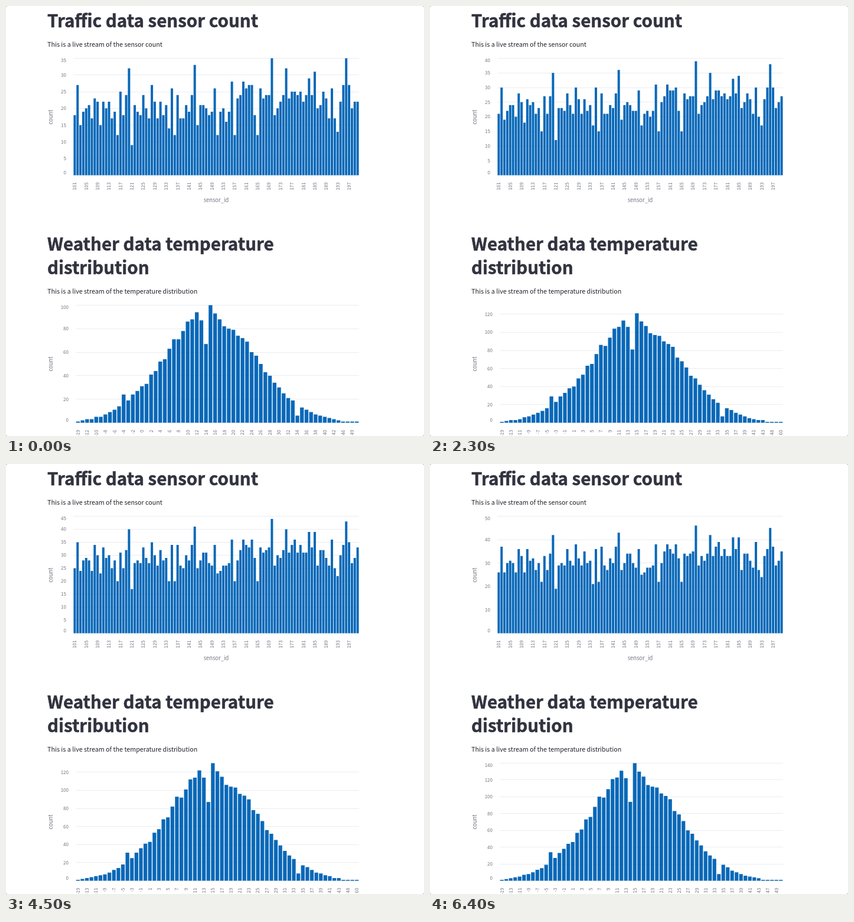
Write an HTML page that moves like this. It is 708x728 px and loops after 8000 ms.

```html
<!DOCTYPE html>
<html lang="en">
<head>
<meta charset="utf-8">
<title>Live stream charts</title>
<style>
  html, body { margin: 0; width: 100%; height: 100%; overflow: hidden; background: #a4a4a6; }
  svg { display: block; width: 708px; height: 728px; font-family: "Noto Sans CJK JP", "Noto Sans CJK SC", "Noto Sans CJK", "Noto Sans", sans-serif; }
  .head { font-size: 29.5px; font-weight: 700; fill: #31333f; stroke: #31333f; stroke-width: 0.55px; }
  .note { font-size: 10.74px; fill: #20212a; }
  .axis { font-size: 9.35px; fill: #717580; text-anchor: middle; }
  .tick { font-size: 8px; fill: #717580; text-anchor: end; }
  .grid { stroke: #e9edf2; }
  .bars { fill: #0868b8; }
</style>
</head>
<body>
<svg viewBox="0 0 708 728">
  <rect width="708" height="728" rx="3" fill="#fff"/>
  <text class="head" x="70" y="36">Traffic data sensor count</text>
  <text class="note" x="70" y="69">This is a live stream of the sensor count</text>
  <g id="traffic"></g>
  <text class="axis" transform="translate(78.5 188) rotate(-90)">count</text>
  <text class="axis" x="356" y="332">sensor_id</text>
  <text class="head" x="70" y="414">Weather data temperature</text>
  <text class="head" x="70" y="453.5">distribution</text>
  <text class="note" x="70" y="486.5">This is a live stream of the temperature distribution</text>
  <g id="weather"></g>
  <text class="axis" transform="translate(78.5 606) rotate(-90)">count</text>
</svg>
<script>
const LOOP = 8000;

// Each update: start ms, counts added per sensor, temperature growth factor
const updates = [
  [0, -3.4, 0.86],
  [400, -1.4, 0.94],
  [500, 0, 1],
  [2300, 0, 1.04],
  [2400, 2, 1.05],
  [4300, 2.4, 1.08],
  [4400, 3.7, 1.1],
  [4500, 5, 1.12],
  [4900, 5, 1.16],
  [5000, 5, 1.17],
  [6300, 6.3, 1.19],
  [6400, 7.2, 1.205]
];

// The most visible peaks and dips; seeded noise fills in the rest
const sensorMarks = { 116: 15, 120: 35, 121: 12, 136: 15, 143: 36, 157: 15, 165: 15, 170: 38.5, 175: 35, 185: 34, 196: 38 };
const tempMarks = { "-4": 28, 12: 109, 14: 78, 15: 116, 34: 7 };

function seeded(seed) {
  return () => {
    seed = (seed * 1664525 + 1013904223) >>> 0;
    return seed / 4294967296;
  };
}

const rand = seeded(11);
const noise = () => rand() + rand() - 1;
const range = (from, to) => Array.from({ length: to - from + 1 }, (_, i) => from + i);
const bell = d => 106 * Math.exp(-(((d - 15) / 14.4) ** 2));

const sensors = range(101, 200).map(label => ({
  label,
  count: sensorMarks[label] ?? 25 + 9 * noise(),
  rate: label in sensorMarks ? 1 : 1 + 0.4 * noise()
}));

const temps = [-19, ...range(-14, 43), ...range(46, 49), 60].map(label => ({
  label,
  count: tempMarks[label] ?? bell(label) * (1 + 0.08 * noise()),
  since: label === -14 ? 500 : label === 47 ? 4900 : 0
}));

const trafficBox = { left: 114, right: 598, top: 88.5, base: 286.5, tickX: 102 };
const weatherBox = { left: 118, right: 598, top: 506.5, base: 705.5, tickX: 106 };

function chart(box, data, nice, ticksEvery, labelEvery) {
  const peak = Math.max(...data.map(d => d.value));
  const max = Math.ceil(peak / nice) * nice;
  const scale = (box.base - box.top) / max;
  const band = (box.right - box.left) / data.length;
  const tickStep = ticksEvery(max);
  let grid = "", ticks = "", bars = "";

  for (let v = 0; v <= max; v += tickStep) {
    const y = box.base - v * scale;
    const shift = v === 0 ? -4 : v === max ? 3.5 : 0;
    grid += `M${box.left} ${Math.floor(y) + 0.5}H${box.right}`;
    ticks += `<text class="tick" x="${box.tickX}" y="${y + shift + 2.9}">${v}</text>`;
  }
  data.forEach(({ label, value }, i) => {
    const mid = box.left + (i + 0.5) * band;
    const half = band * 0.41;
    bars += `M${mid - half} ${box.base}V${box.base - value * scale}H${mid + half}V${box.base}Z`;
    if (i % labelEvery === 0) {
      ticks += `<text class="tick" transform="translate(${mid + 2.9} ${box.base + 12}) rotate(-90)">${label}</text>`;
    }
  });
  return `<path class="grid" d="${grid}"/><path class="bars" d="${bars}"/>${ticks}`;
}

const traffic = document.getElementById("traffic");
const weather = document.getElementById("weather");

function draw([start, added, growth]) {
  const sensorData = sensors.map(({ label, count, rate }) => ({
    label, value: Math.round(count + added * rate)
  }));
  const tempData = temps.filter(t => t.since <= start).map(({ label, count }) => ({
    label, value: Math.max(1, Math.round(count * growth))
  }));
  traffic.innerHTML = chart(trafficBox, sensorData, 5, max => max < 50 ? 5 : 10, 4);
  weather.innerHTML = chart(weatherBox, tempData, 10, () => 20, 2);
}

let shown = null;
function tick() {
  const t = performance.now() % LOOP;
  const update = updates.findLast(u => u[0] <= t);
  if (update !== shown) draw(shown = update);
  requestAnimationFrame(tick);
}
tick();
</script>
</body>
</html>
```
